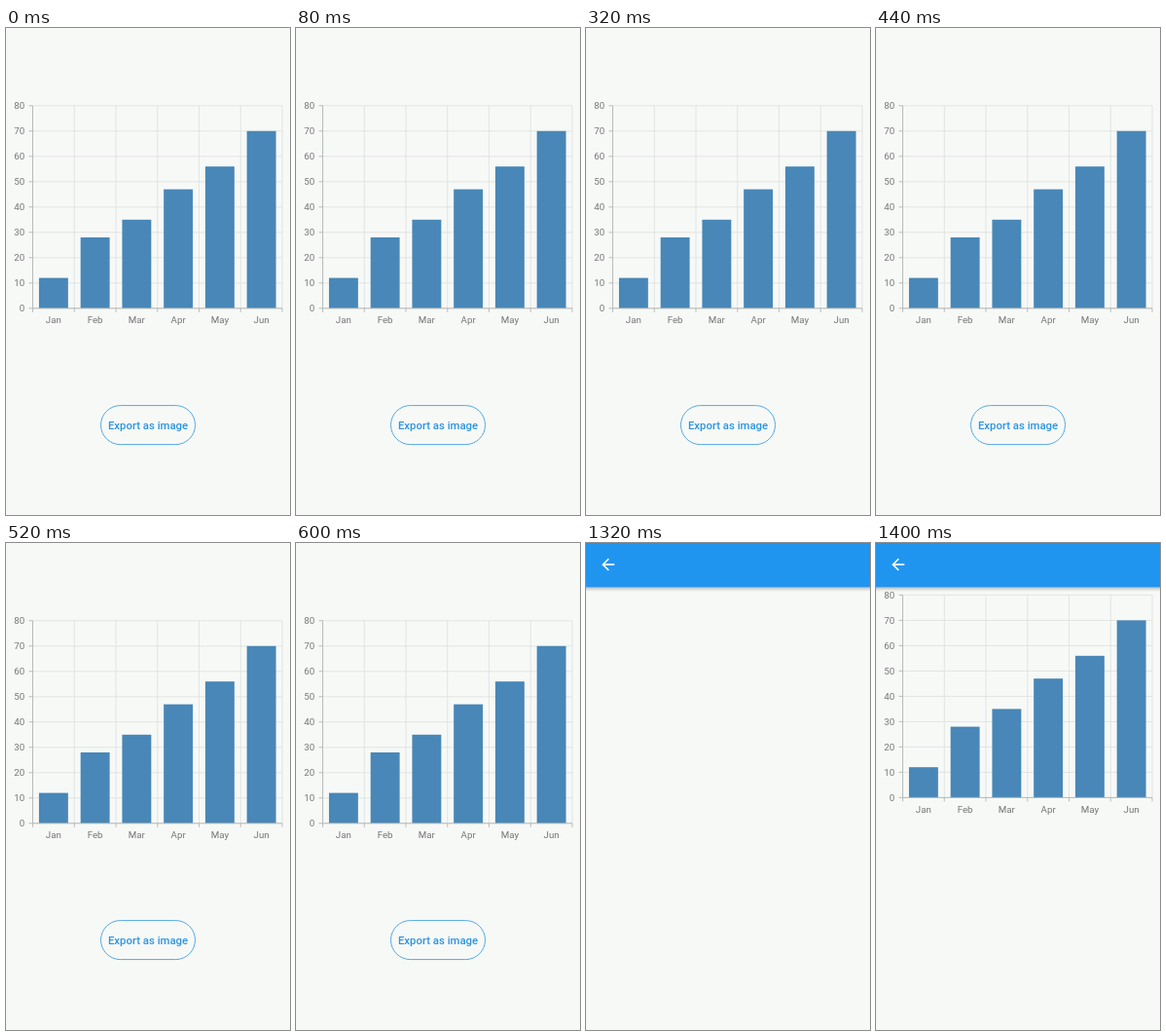
An HTML page for the animation above (2680 ms loop, 292 by 500 pixels).

```html
<!DOCTYPE html>
<html lang="en">
<head>
<meta charset="utf-8">
<title>Chart export</title>
<style>
  html, body { margin: 0; width: 100%; height: 100%; overflow: hidden; background: #f7f9f7; }
  svg { display: block; width: 292px; height: 500px; font-family: Roboto, Arial, sans-serif; }
  .label { font-size: 9.73px; fill: #757675; }
  .grid { stroke: #dce0de; stroke-width: .8; }
  .axis { stroke: #b3b6b5; stroke-width: .9; }
  .bar { fill: #4887b7; }
</style>
</head>
<body>
<svg id="stage" viewBox="0 0 292 500">
  <defs>
    <linearGradient id="shade" x2="0" y2="1">
      <stop offset="0" stop-color="#000" stop-opacity=".36"/>
      <stop offset=".4" stop-color="#000" stop-opacity=".13"/>
      <stop offset="1" stop-color="#000" stop-opacity="0"/>
    </linearGradient>
  </defs>
  <g id="chart"></g>
  <g id="button">
    <rect x="97.5" y="387.6" width="97" height="40" rx="20" fill="none" stroke="#4ba5e2" stroke-width=".95"/>
    <text x="146" y="411.7" text-anchor="middle" font-size="11.36" font-weight="500" fill="#2b94e2">Export as image</text>
  </g>
  <circle id="touch" cx="153" cy="411.5" r="8.8" fill="#fff" fill-opacity=".5" stroke="#c3cdd2" stroke-width=".9"/>
  <g id="header">
    <rect y="45" width="292" height="5" fill="url(#shade)"/>
    <rect width="292" height="45" fill="#2095f0"/>
    <path transform="translate(13 12.4) scale(.811)" fill="#fff"
      d="M20 11H7.83l5.59-5.59L12 4l-8 8 8 8 1.41-1.41L7.83 13H20v-2z"/>
  </g>
</svg>
<script>
const LOOP = 2680;
const PRESS = 100, RELEASE = 320;
const OPEN = 1320, LOADED = 1400;
const LIFT = 26.4;

const months = ['Jan', 'Feb', 'Mar', 'Apr', 'May', 'Jun'];
const values = [12, 28, 35, 47, 56, 70];
const left = 27.5, right = 284, base = 287.8, unit = 2.6;
const slot = (right - left) / months.length;
const $ = id => document.getElementById(id);
const chart = $('chart');

function add(tag, attrs, text) {
  const el = document.createElementNS('http://www.w3.org/2000/svg', tag);
  for (const key in attrs) el.setAttribute(key, attrs[key]);
  if (text !== undefined) el.textContent = text;
  chart.append(el);
}
const line = (kind, x1, y1, x2, y2) => add('line', { class: kind, x1, y1, x2, y2 });
const label = (x, y, anchor, text) => add('text', { class: 'label', x, y, 'text-anchor': anchor }, text);

function buildChart() {
  const top = base - 80 * unit;
  for (let v = 0; v <= 80; v += 10) {
    const y = base - v * unit;
    line('grid', left, y, right, y);
    line('axis', left - 4, y, left, y);
    label(19.3, y + 3.4, 'end', v);
  }
  for (let i = 0; i <= months.length; i++) {
    const x = left + i * slot;
    line('grid', x, top, x, base);
    line('axis', x, base, x, base + 4);
  }
  line('axis', left, top, left, base);
  values.forEach((v, i) => {
    const x = left + (i + .5) * slot;
    add('rect', { class: 'bar', x: x - slot * .35, y: base - v * unit, width: slot * .7, height: v * unit });
    label(x, base + 15.6, 'middle', months[i]);
  });
  line('axis', left, base, right, base);
}

const show = (id, on) => { $(id).style.display = on ? '' : 'none'; };

function draw(t) {
  const opened = t >= OPEN, loaded = t >= LOADED;
  show('chart', !opened || loaded);
  show('button', !opened);
  show('header', opened);
  show('touch', t >= PRESS && t < RELEASE);
  chart.setAttribute('transform', `translate(0 ${loaded ? -LIFT : 0})`);
}

buildChart();
const start = performance.now();
function tick() {
  draw((performance.now() - start) % LOOP);
  requestAnimationFrame(tick);
}
tick();
</script>
</body>
</html>
```
